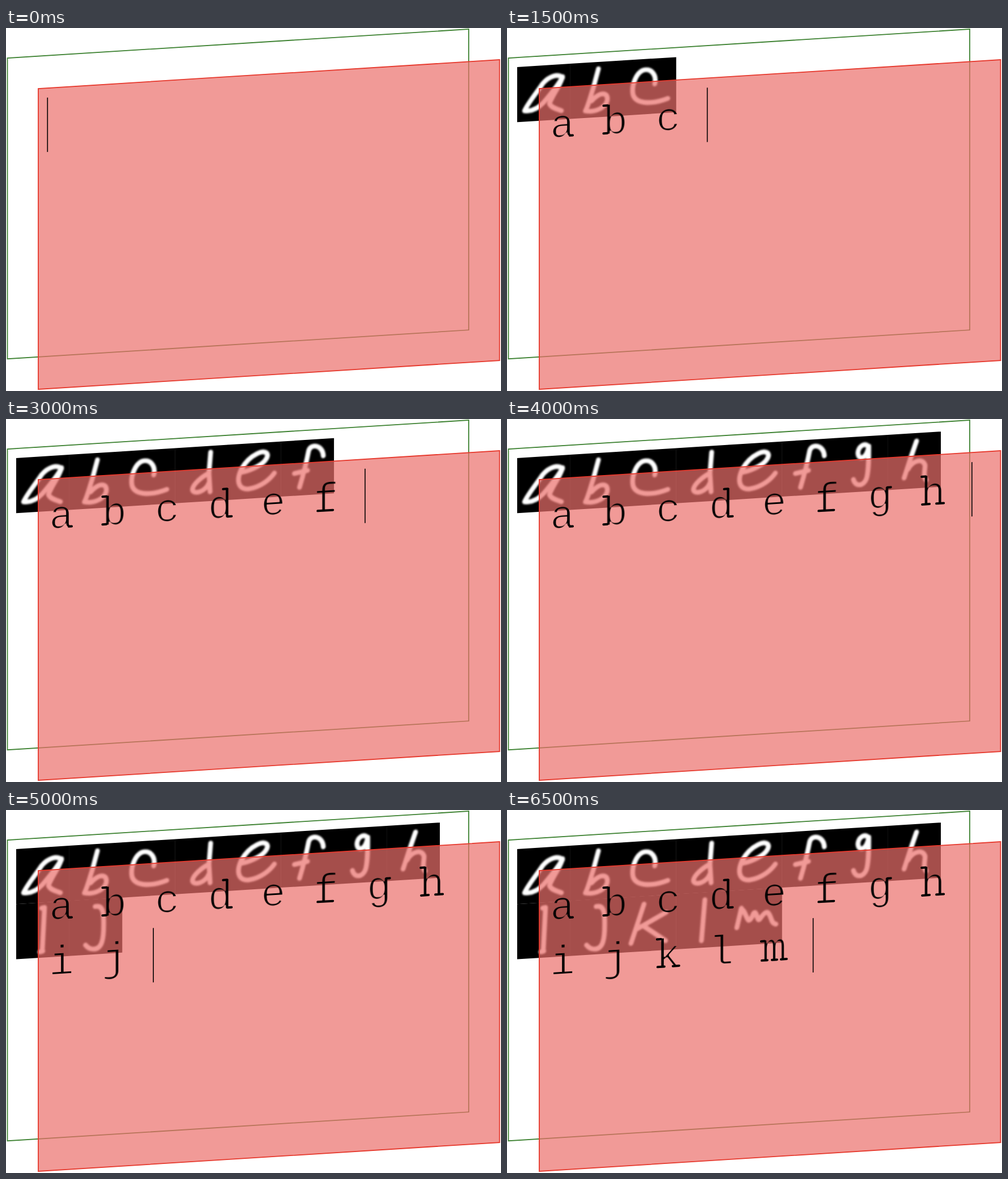
Recreate the animation shown at these times as an HTML page. Size 874x641 px, loop 7 s.

```html
<!DOCTYPE html>
<html lang="en">
<head>
<meta charset="utf-8">
<title>Handwriting to text</title>
<style>
  html, body { margin: 0; width: 100%; height: 100%; overflow: hidden; background: #fff; }
  svg { display: block; width: 100vw; height: 100vh; }
  .ink { fill: none; stroke: #fff; stroke-width: 8.5; stroke-linecap: round; stroke-linejoin: round; filter: url(#soft); }
  .type { font: 73px "Liberation Mono", "Courier New", monospace; text-anchor: middle; filter: url(#thin); }
  .slab { fill: none; stroke: #000; stroke-width: 4; stroke-linecap: round; }
</style>
</head>
<body>
<svg viewBox="0 0 874 641" xmlns="http://www.w3.org/2000/svg">
  <defs>
    <filter id="soft" filterUnits="userSpaceOnUse" x="0" y="0" width="94" height="98">
      <feGaussianBlur stdDeviation="1.5"/>
    </filter>
    <filter id="thin" x="-20%" y="-20%" width="140%" height="140%">
      <feMorphology operator="erode" radius="1"/>
    </filter>
  </defs>
  <g transform="matrix(1 -.0626 0 1 0 0)">
    <rect x="2.5" y="53.2" width="814.5" height="531.2" fill="#fff" stroke="#3c8130" stroke-width="1.8"/>
    <g id="tiles"></g>
    <rect x="57" y="110.6" width="814.5" height="531" fill="#ec706b" fill-opacity=".7" stroke="#e6382c" stroke-width="1.8"/>
    <g id="letters"></g>
    <path id="cursor" d="M0 0V96" stroke="#000" stroke-width="1.6"/>
  </g>
</svg>
<script>
const COLS = 8, STEP = 500, DX = 93.45, DY = 97.2;
const alphabet = "abcdefghijklm";

// Pen strokes inside one tile
const ink = {
  a: "M80 24C72 15 56 20 45 32C34 48 18 66 13 78C25 80 36 76 46 66C62 48 76 32 80 22C78 34 62 54 57 68C60 76 70 78 78 82",
  b: "M50 12L41 45C36 60 32 76 27 85C38 88 58 86 65 71C69 56 56 50 38 68",
  c: "M56 45C60 28 48 15 34 20C24 24 16 42 17 57C18 80 52 81 79 72",
  d: "M63 11L60 48L62 81M60 48C50 52 30 66 31 76C34 85 54 80 60 65",
  e: "M24 50C40 48 68 38 70 23C68 8 38 20 24 44C13 66 20 82 38 80C58 78 74 66 82 55",
  f: "M75 30C74 10 52 6 49 20C46 36 40 60 33 83M24 58L47 54",
  g: "M59 18C52 10 42 18 41 28C41 42 56 42 60 18C60 40 60 62 56 75C50 89 36 88 33 75",
  h: "M51 14L40 45L29 78M36 63C44 48 62 44 66 58C66 68 62 78 68 84",
  i: "M45 10L50 9L46 86M42 87L47 86",
  j: "M46 13C62 10 61 32 61 46C61 72 58 88 44 88C36 88 32 84 29 80",
  k: "M37 14L14 82M76 31L25 57M38 54L75 81",
  l: "M51 13L45 85",
  m: "M22 32L14 66M22 34C28 34 32 56 36 54C42 52 42 40 46 41C50 44 50 56 54 54C60 46 66 38 70 44C76 52 74 62 83 64"
};

// Slab serifs, relative to the letter's centre and baseline
const slab = {
  a: "M13-2H18",
  b: "M-21-51H-14M-21-2H-14",
  d: "M5-51H12M13-2H20",
  f: "M-15-2H12",
  g: "M13-36H19",
  h: "M-20-51H-13M-19-2H-6M6-2H19",
  k: "M-20-51H-13M-19-2H-7M8-2H19",
  m: "M-23-36H-17M-22-2H-12M-4-2H5M12-2H22"
};

const $ = id => document.getElementById(id);

function el(parent, name, attrs, text) {
  const node = document.createElementNS("http://www.w3.org/2000/svg", name);
  for (const key in attrs) node.setAttribute(key, attrs[key]);
  if (text) node.textContent = text;
  return parent.appendChild(node);
}

function cell(parent, i, x, y) {
  const row = Math.floor(i / COLS), col = i % COLS;
  return el(parent, "g", { transform: `translate(${x + col * DX} ${y + row * DY})` });
}

const cells = [...alphabet].map((ch, i) => {
  const tile = cell($("tiles"), i, 18, 70.1);
  el(tile, "rect", { width: DX + .4, height: 97.4 });
  el(tile, "path", { class: "ink", d: ink[ch] });
  const letter = cell($("letters"), i, 98, 198.8);
  el(letter, "text", { class: "type" }, ch);
  if (slab[ch]) el(letter, "path", { class: "slab", d: slab[ch] });
  return [tile, letter];
});

function draw(time) {
  const typed = Math.floor(time / STEP) % (alphabet.length + 1);
  cells.forEach((pair, i) => {
    for (const node of pair) node.style.display = i < typed ? "" : "none";
  });
  const row = Math.max(0, Math.ceil(typed / COLS) - 1);
  const x = 73.3 + (typed - row * COLS) * DX, y = 127.5 + row * DY;
  $("cursor").setAttribute("transform", `translate(${x} ${y})`);
}

const start = performance.now();
function tick() {
  draw(performance.now() - start);
  requestAnimationFrame(tick);
}
tick();
</script>
</body>
</html>
```
